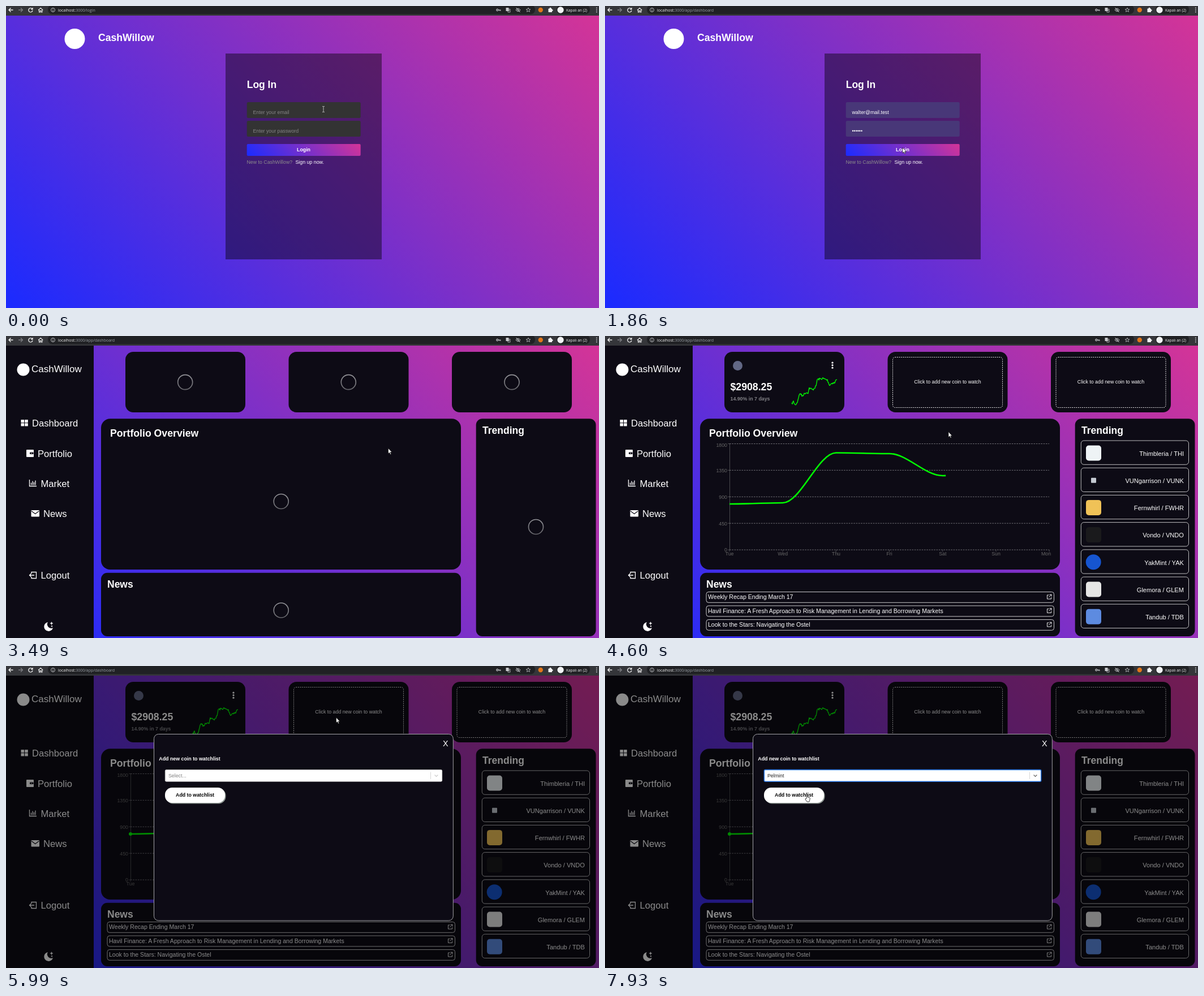
Animation, 1048 px wide and 534 px high, one loop 8000 ms. Source, as an HTML page:

```html
<!DOCTYPE html>
<html lang="en">
<head>
<meta charset="utf-8">
<title>Coin dashboard</title>
<style>
  html, body { margin: 0; width: 100%; height: 100%; overflow: hidden; background: #0d0b15; }
  svg { display: block; width: 1048px; height: 534px; font-family: "Liberation Sans", Arial, sans-serif; }
  .bar { font-family: "Open Sans", "Noto Sans", sans-serif; }
</style>
</head>
<body>
<script>
const LOOP = 8000;
const INK = '#0d0b15', GREEN = '#00ff00';
const BRAND = 'CashWillow';

// Markup helpers
const rect = (x, y, w, h, r, fill, more = '') =>
  `<rect x="${x}" y="${y}" width="${w}" height="${h}" rx="${r}" fill="${fill}" ${more}/>`;
const text = (x, y, str, size, fill = '#fff', more = '') =>
  `<text x="${x}" y="${y}" font-size="${size}" fill="${fill}" ${more}>${str}</text>`;
const bold = (x, y, str, size, fill = '#fff', more = '') =>
  text(x, y, str, size, fill, 'font-weight="700" ' + more);
const circle = (x, y, r, fill) => `<circle cx="${x}" cy="${y}" r="${r}" fill="${fill}"/>`;
const line = (d, color, width = 1, more = '') =>
  `<path d="${d}" fill="none" stroke="${color}" stroke-width="${width}" ${more}/>`;
const solid = (d, fill) => `<path d="${d}" fill="${fill}"/>`;
const group = (id, body) => `<g id="${id}">${body}</g>`;
const MID = 'text-anchor="middle"', END = 'text-anchor="end"';

// 45 degree gradient that spans a box the way CSS does
function diagonal(id, x, y, w, h) {
  const cx = x + w / 2, cy = y + h / 2, k = (w + h) / 4;
  return `<linearGradient id="${id}" gradientUnits="userSpaceOnUse" x1="${cx - k}" y1="${cy + k}" x2="${cx + k}" y2="${cy - k}">
    <stop stop-color="#1a2bff"/><stop offset="1" stop-color="#d43497"/></linearGradient>`;
}

function toolbar() {
  const w = '#f1f1f1', g = '#c8cacd';
  return rect(0, 0, 1048, 17, 0, '#35363a') +
    rect(74, -2, 861, 16.5, 8, '#202124') +
    rect(973, -2, 59, 16.5, 8, '#202124') +
    line('M12.5 7H5M8.5 3.5L5 7l3.5 3.5', w, 1.3) +
    line('M22 7h7.5M26 3.5L29.5 7 26 10.5', '#7d7e82', 1.3) +
    line('M46.3 5A3.6 3.6 0 1 0 47 8', w, 1.3) + solid('M47.6 2.6v4h-4z', w) +
    line('M57 7.4L61.2 3.4 65.4 7.4M58.5 6.5V11h1.8V8.3h1.8V11h1.8V6.5', w, 1.1) +
    line('M83 6.5v3M83 4.4v1.1M86.5 7a3.5 3.5 0 1 1-7 0a3.5 3.5 0 1 1 7 0', g, .9) +
    group('urlLogin', url('3000/login')) + group('urlApp', url('3000/app/dashboard')) +
    line('M870 7a1.6 1.6 0 1 1-3.2 0a1.6 1.6 0 1 1 3.2 0h3.8v1.8M872 7v1.5', g, 1.2) +
    rect(883.5, 3, 5, 6, .6, g) + line('M887 5.5h4v5.500h-4zM888 7.500h2M889 7v2', g, .8) +
    line('M901 7q4-5 8 0q-4 5-8 0M901.500 3l7 8', g, 1) + circle(905, 7, 1.2, g) +
    line('M923 3.2l1.100 2.500 2.700.2-2.100 1.700.7 2.700-2.400-1.500-2.400 1.500.7-2.700-2.100-1.700 2.700-.2z', g, .8) +
    circle(944.8, 7, 4.2, '#e2761b') +
    rect(958.5, 4.5, 6.5, 6.5, .8, '#f5f5f5') + circle(962, 4.2, 1.4, '#f5f5f5') + circle(965.3, 7.6, 1.4, '#f5f5f5') +
    circle(980, 7, 5.7, '#f1f3f4') +
    text(990, 9.6, 'Kapalı an (2)', 6.5, '#f1f1f1', 'class="bar"') +
    [3.4, 7, 10.6].map(y => circle(1043.8, y, 1, g)).join('');
}
const url = path => text(92, 9.6, `<tspan fill="#f0f0f0">localhost:</tspan>${path}`, 7, '#9aa0a6', 'class="bar"');

function login() {
  const fields = (fill, a, b, ink) => rect(425.7, 170, 201, 28, 2.5, fill) + rect(425.7, 203, 201, 28, 2.5, fill) +
    text(436.500, 191, a, 8.800, ink) + text(436.500, 223.700, b, 8.800, ink);
  return circle(121.500, 58, 18, '#fff') + bold(163, 62, BRAND, 17.600) +
    rect(388, 84, 276, 364, 0, '#000', 'opacity=".43"') +
    bold(425.700, 144.700, 'Log In', 17.500) +
    group('blank', fields('#333', 'Enter your email', 'Enter your password', '#858585')) +
    group('filled', fields('#483778', 'walter@mail.test', '••••••', '#fff')) +
    rect(425.700, 244, 201, 21, 2, 'url(#button)') +
    bold(526, 257.300, 'Login', 8.800, '#fff', MID) +
    text(425.500, 279.300, `New to ${BRAND}?`, 8.800, '#8c8c8c') +
    text(511.500, 279.300, 'Sign up now.', 8.800);
}

function sidebar() {
  const item = (x, y, str) => text(x, y, str, 16.600);
  return rect(0, 17, 155, 517, 0, INK) +
    circle(30.500, 59.500, 11, '#fff') + text(45, 64, BRAND, 17) +
    item(46, 160, 'Dashboard') + item(56, 213.500, 'Portfolio') + item(61.500, 266.500, 'Market') +
    item(66, 320, 'News') + item(61.500, 429, 'Logout') +
    [[26.500, 148], [33.200, 148], [26.500, 154.200], [33.200, 154.200]].map(([x, y]) => rect(x, y, 5.600, 5.200, 0, '#fff')).join('') +
    rect(36, 201, 13, 13, 1, '#fff') + rect(42, 205.500, 6.500, 3.500, 1, INK) + circle(45, 207.300, .8, '#fff') +
    line('M41.500 254v11.500h12.500M44.500 263.500v-4M47 263.500v-7M49.500 263.500v-5M52 263.500v-8', '#fff', 1.300) +
    rect(44.500, 308, 14.500, 11.500, 1, '#fff') + line('M45 309.500l6.700 5 6.700-5', INK, 1.200) +
    line('M45 420v-2.500h8.500v11H45V426M50 423H41.500M44.500 420l-3 3 3 3', '#fff', 1.300) +
    solid('M74 506a8 8 0 1 0 9 10a7 7 0 0 1-9-10z', '#fff') +
    solid('M80.500 505l.9 2.200 2.200.9-2.200.9-.9 2.200-.9-2.200-2.200-.9 2.200-.9zM81 511.500l.6 1.100 1.100.6-1.100.6-.6 1.100-.6-1.100-1.100-.6 1.100-.6z', '#fff');
}

const spinner = (x, y) =>
  `<g transform="translate(${x} ${y})"><circle class="spin" r="13" fill="none" stroke="url(#ring)" stroke-width="1.700"/></g>`;

// Jagged price line through a few points
function sparkline() {
  const pts = [[330, 120], [333, 116], [336, 122], [340, 117], [342, 108], [345, 101], [348, 106], [355, 100], [359, 100],
    [361, 92], [367, 95], [373, 89], [375, 77], [385, 75], [393, 78], [397, 87], [401, 83], [406, 83], [409, 76]];
  let seed = 7;
  const jitter = () => ((seed = seed * 16807 % 2147483647) / 2147483647 - .5) * 4;
  const out = [];
  pts.slice(1).forEach(([x, y], i) => {
    const [px, py] = pts[i];
    for (let a = px; a < x; a++) out.push(`${a} ${(py + (y - py) * (a - px) / (x - px) + jitter()).toFixed(1)}`);
  });
  return line('M' + out.join('L') + 'L410 77', GREEN, 1.300, 'stroke-linejoin="round"');
}

function watchCards() {
  const add = x => rect(x - 97, 37.500, 194, 89, 4, 'none', 'stroke="#fff" stroke-width=".9" stroke-dasharray="2 1.600"') +
    text(x, 84.400, 'Click to add new coin to watch', 8.800, '#fff', MID);
  return circle(234.500, 52.500, 8.500, '#626885') +
    [47.200, 51.700, 56.200].map(y => circle(402, y, 1.600, '#fff')).join('') +
    bold(221.500, 96, '$2908.25', 17.700) + bold(221.500, 113.800, '14.90% in 7 days', 8.800, '#808085') +
    sparkline() + add(605.500) + add(894);
}

const dayX = i => 220 + 94.200 * i;
const values = [297, 295, 206.500, 208, 247, 236, 240];

function chart() {
  const dash = 'stroke-dasharray="2.600 1.700"';
  let out = line('M220.500 190V378', '#5a5a5e', .8);
  for (let i = 0; i < 5; i++) {
    const y = 190.500 + 46.900 * i;
    out += line(`M220 ${y}H785`, '#8a8a8e', .8, dash) + line(`M217 ${y}h3`, '#5a5a5e', .8) +
      text(216, i ? y + 3.300 : y + 5.200, 1800 - 450 * i, 8.800, '#666', END);
  }
  ['Tue', 'Wed', 'Thu', 'Fri', 'Sat', 'Sun', 'Mon'].forEach((d, i) => {
    out += line(`M${dayX(i)} 378v3.500`, '#5a5a5e', .8) + text(i < 6 ? dayX(i) : 779.500, 388, d, 8.800, '#666', MID);
  });
  let d = `M220 ${values[0]}`;
  for (let i = 1; i < 7; i++)
    d += `C${dayX(i - 1) + 31.400} ${values[i - 1]} ${dayX(i) - 31.400} ${values[i]} ${dayX(i)} ${values[i]}`;
  return out + line(d, GREEN, 2.600, 'id="curve" pathLength="1" stroke-dasharray="0 2"') +
    group('dots', values.map((y, i) => circle(dayX(i), y, 3, GREEN)).join(''));
}

function news() {
  return ['Weekly Recap Ending March 17',
    'Havil Finance: A Fresh Approach to Risk Management in Lending and Borrowing Markets',
    'Look to the Stars: Navigating the Ostel'].map((str, i) => {
    const y = 452.500 + 24.500 * i;
    return rect(179, y, 614.500, 18.800, 4, 'none', 'stroke="#ddd" stroke-width=".9"') +
      text(182, y + 12.700, str, 10.550) +
      line(`M784.500 ${y + 5.500}h-3v7h7v-3M785.500 ${y + 4.700}h3.500v3.500M789 ${y + 4.700}l-5 5`, '#fff', .9);
  }).join('');
}

function trending() {
  return [['Thimbleria / THI', '#eef3f5'], ['VUNgarrison / VUNK', '#c5cad2', 9], ['Fernwhirl / FWHR', '#f0c257'],
    ['Vondo / VNDO', '#1a1a1c'], ['YakMint / YAK', '#1655d0'], ['Glemora / GLEM', '#e6e6e6'], ['Tandub / TDB', '#5d8be0']]
    .map(([str, color, size = 27], i) => {
      const y = 185 + 48.200 * i;
      const mark = i === 4 ? circle(863.200, y + 22, 13.500, color)
        : rect(863.500 - size / 2, y + 22 - size / 2, size, size, size > 9 ? 5 : 1, color);
      return rect(841.300, y, 190.200, 42.300, 5, 'none', 'stroke="#d0d0d0" stroke-width=".9"') +
        mark + text(1023, y + 26.800, str, 11.100, '#fff', END);
    }).join('');
}

function dashboard() {
  return sidebar() +
    [211, 499.500, 788].map(x => rect(x, 28, 212, 107, 14, INK)).join('') +
    rect(168, 146.300, 636, 266.700, 16, INK) + rect(168, 418.700, 636, 112.300, 11, INK) +
    rect(830.700, 146.300, 211.800, 384.700, 11, INK) +
    bold(184, 178, 'Portfolio Overview', 17.700) + bold(842, 172.700, 'Trending', 17.500) + bold(179, 445, 'News', 17.500) +
    group('waitCards', spinner(316.700, 81.700) + spinner(605.300, 81.700) + spinner(894, 81.700)) +
    group('waitChart', spinner(486.200, 292.500)) +
    group('waitLists', spinner(486.200, 485) + spinner(936.500, 337.500)) +
    group('cards', watchCards()) + group('chart', chart()) + group('lists', news() + trending());
}

function modal() {
  const select = (border, width, arrow) =>
    rect(281.300, 183.500, 489.400, 20.700, 2, '#fff', `stroke="${border}" stroke-width="${width}"`) +
    line('M750.500 187.500V200', '#ccc', .8) + line('M757.600 192.500l2.900 2.900 2.900-2.900', arrow, 1.200);
  const coins = ['Pelmint', 'Ambervane', 'Moorel', 'KVK', 'EUV Cash', 'ZLQ', 'Fenna', 'Velmiro', 'Nerida'];
  return rect(0, 17, 1048, 517, 0, '#000', 'opacity=".46"') +
    rect(261.500, 120.500, 528.800, 329.700, 8, INK, 'stroke="#a5a5a8" stroke-width="1"') +
    text(776.800, 142, 'X', 14.300, '#fff', MID) +
    bold(270.300, 167.300, 'Add new coin to watchlist', 8.830) +
    rect(282.500, 216.500, 106, 27, 12.500, '#8d9691') + rect(281, 215, 106, 27, 12.500, '#fff') +
    bold(334, 230.700, 'Add to watchlist', 8.800, '#000', MID) +
    group('idle', select('#ccc', .8, '#ccc')) + group('focus', select('#2673e0', 1.500, '#666')) +
    group('hint', text(287, 196.800, 'Select...', 8.800, '#808080')) +
    group('choice', text(287, 196.800, coins[0], 8.800, '#222')) +
    group('menu', line('M287.500 189V199', '#222', .8) + rect(281, 208.500, 490, 165.500, 2, '#fff') +
      rect(281, 211, 482, 18.700, 0, '#deebff') + rect(762.700, 209, 8.300, 14, 3.500, '#858585') +
      `<g clip-path="url(#menuBox)">${coins.map((c, i) => text(288, 223 + 18.750 * i, c, 8.800, '#1c1c1c')).join('')}</g>`);
}

const pointers =
  group('beam', line('M-2-5.500h1.500l.5.500.5-.5H2M0-5V4M-2 4.500h1.500L0 4l.5.500H2', '#c9c9c9', .9)) +
  group('arrow', '<path d="M0 0V9.500l2.200-2 1.500 3.400 1.500-.7-1.500-3.200h2.900z" fill="#fff" stroke="#111" stroke-width=".7"/>') +
  group('hand', '<path d="M-.8 7.500V1a.9.9 0 0 1 1.800 0v3.800l3.800 1q.8.300.7 1.200l-.6 3.500-.8 2.500H.200L-2.600 9q-.6-1.300.6-1.700z" fill="#fff" stroke="#111" stroke-width=".8"/>');

document.body.innerHTML = `<svg viewBox="0 0 1048 534">
  <defs>${diagonal('back', 0, 17, 1048, 517)}${diagonal('button', 425.700, 244, 201, 21)}
    <linearGradient id="ring" x1="0" y1="0" x2="0" y2="1"><stop stop-color="#929297"/><stop offset="1" stop-color="#66666b"/></linearGradient>
    <clipPath id="menuBox"><rect x="281" y="208.500" width="482" height="165.500"/></clipPath></defs>
  ${rect(0, 17, 1048, 517, 0, 'url(#back)')}
  ${group('login', login())}${group('dashboard', dashboard())}${toolbar()}${group('modal', modal())}
  ${group('pointer', pointers)}</svg>`;

// Which part shows when, in ms
const spans = {
  urlLogin: [0, 1860], urlApp: [1860, LOOP],
  login: [0, 2010], blank: [0, 380], filled: [380, 2010],
  dashboard: [2010, LOOP],
  waitLists: [2010, 3640], lists: [3640, LOOP],
  waitCards: [2010, 3790], cards: [3790, LOOP],
  waitChart: [2010, 3930], chart: [3930, LOOP], dots: [5470, LOOP],
  modal: [5990, LOOP], idle: [5990, 6790], focus: [6790, LOOP],
  hint: [5990, 7350], menu: [6790, 7350], choice: [7350, LOOP],
  beam: [0, 630], arrow: [630, 7700], hand: [7700, LOOP]
};

// Pointer path: time, x, y
const path = [[0, 561, 183], [120, 561, 183], [250, 553, 190], [510, 538, 216], [760, 527, 249], [1040, 526, 250.500],
  [2010, 526, 250.500], [3090, 660, 205], [3490, 675.500, 198.500], [3930, 675.500, 198.500], [4330, 650, 188],
  [4600, 607, 169.500], [5320, 585, 92], [5470, 583.500, 91], [6180, 583.500, 91], [6500, 428.500, 196],
  [6790, 428.500, 196], [7080, 400, 215], [7350, 398, 218], [7800, 361, 224], [7930, 356.800, 227], [LOOP, 356.800, 227]];

function pointerAt(t) {
  const i = path.findIndex(p => p[0] > t);
  const [t0, x0, y0] = path[i - 1], [t1, x1, y1] = path[i], p = (t - t0) / (t1 - t0);
  return `translate(${x0 + (x1 - x0) * p} ${y0 + (y1 - y0) * p})`;
}

// cubic-bezier(.25, .1, .25, 1)
function ease(p) {
  if (p <= 0 || p >= 1) return Math.min(1, Math.max(0, p));
  const bez = (a, b, u) => 3 * a * u * (1 - u) ** 2 + 3 * b * u * u * (1 - u) + u ** 3;
  let lo = 0, hi = 1;
  for (let i = 0; i < 24; i++) {
    const u = (lo + hi) / 2;
    if (bez(.25, .25, u) < p) lo = u; else hi = u;
  }
  return bez(.1, 1, lo);
}

const el = id => document.getElementById(id);
const parts = Object.entries(spans).map(([id, span]) => [el(id), ...span]);
const spins = document.querySelectorAll('.spin'), curve = el('curve'), pointer = el('pointer');

function draw() {
  const t = performance.now() % LOOP;
  for (const [node, from, to] of parts) node.style.display = t >= from && t < to ? '' : 'none';
  spins.forEach(s => s.setAttribute('transform', `rotate(${(t - 3490) * .36})`));
  curve.setAttribute('stroke-dasharray', `${ease((t - 3990) / 1480)} 2`);
  pointer.setAttribute('transform', pointerAt(t));
  requestAnimationFrame(draw);
}
draw();
</script>
</body>
</html>
```
